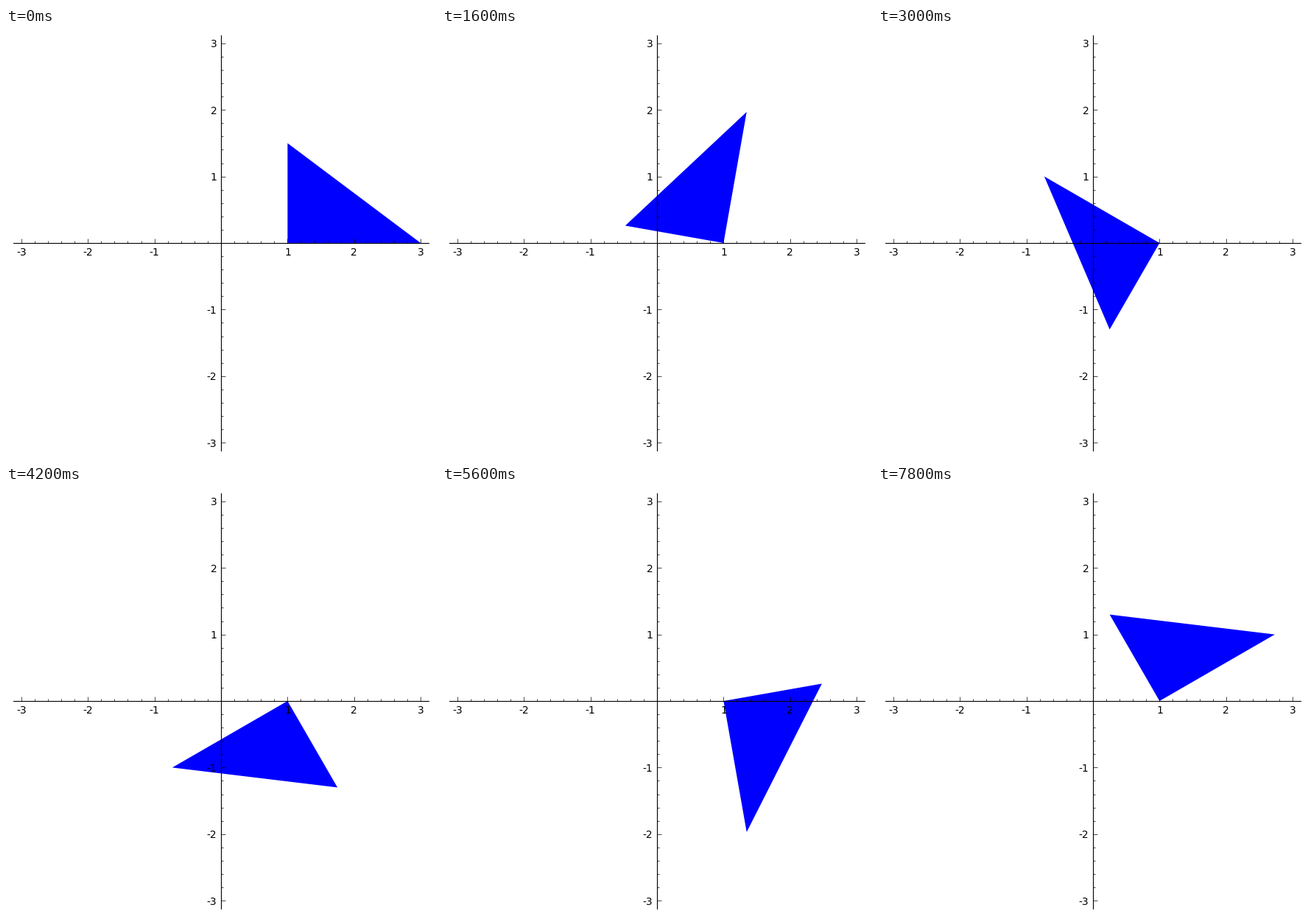
Write a matplotlib script that moves like this. It is 584 px wide and 584 px high and loops after 8 s.

```python
import numpy as np
import matplotlib.pyplot as plt
from matplotlib.animation import FuncAnimation
from matplotlib.ticker import FuncFormatter, MultipleLocator

SIZE, DPI = 584, 100
MARGIN = 10
LIMIT = 3.12
FRAMES, INTERVAL = 40, 200
STEP = np.radians(10)

PIVOT = np.array([1.0, 0.0])
CORNERS = np.array([[0, 0], [2, 0], [0, 1.5]])

plt.rcParams["font.family"] = "DejaVu Sans"


def label(value, _pos):
    n = round(value)
    return str(n) if n else ""


def make_axes(fig):
    pad = MARGIN / SIZE
    ax = fig.add_axes([pad, pad, 1 - 2 * pad, 1 - 2 * pad])
    ax.set(xlim=(-LIMIT, LIMIT), ylim=(-LIMIT, LIMIT), facecolor="none")
    ax.set_axisbelow(False)
    for side in ("top", "right"):
        ax.spines[side].set_visible(False)
    for side in ("left", "bottom"):
        ax.spines[side].set_position("zero")
        ax.spines[side].set_linewidth(0.8)
    for axis in (ax.xaxis, ax.yaxis):
        axis.set_major_locator(MultipleLocator(1))
        axis.set_minor_locator(MultipleLocator(0.2))
        axis.set_major_formatter(FuncFormatter(label))
    ax.tick_params(which="both", direction="in", width=0.5)
    ax.tick_params(which="major", length=4, pad=4, labelsize=10)
    ax.tick_params(which="minor", length=2)
    return ax


def rotated(angle):
    c, s = np.cos(angle), np.sin(angle)
    return PIVOT + CORNERS @ np.array([[c, s], [-s, c]])


fig = plt.figure(figsize=(SIZE / DPI, SIZE / DPI), dpi=DPI, facecolor="white")
ax = make_axes(fig)
triangle = plt.Polygon(rotated(0), facecolor="blue", edgecolor="none",
                       linewidth=0, zorder=1)
ax.add_patch(triangle)


def draw(i):
    triangle.set_xy(rotated(i * STEP))
    return [triangle]


anim = FuncAnimation(fig, draw, frames=FRAMES, interval=INTERVAL,
                     init_func=lambda: draw(0), repeat=True, repeat_delay=0)
plt.show()
```
